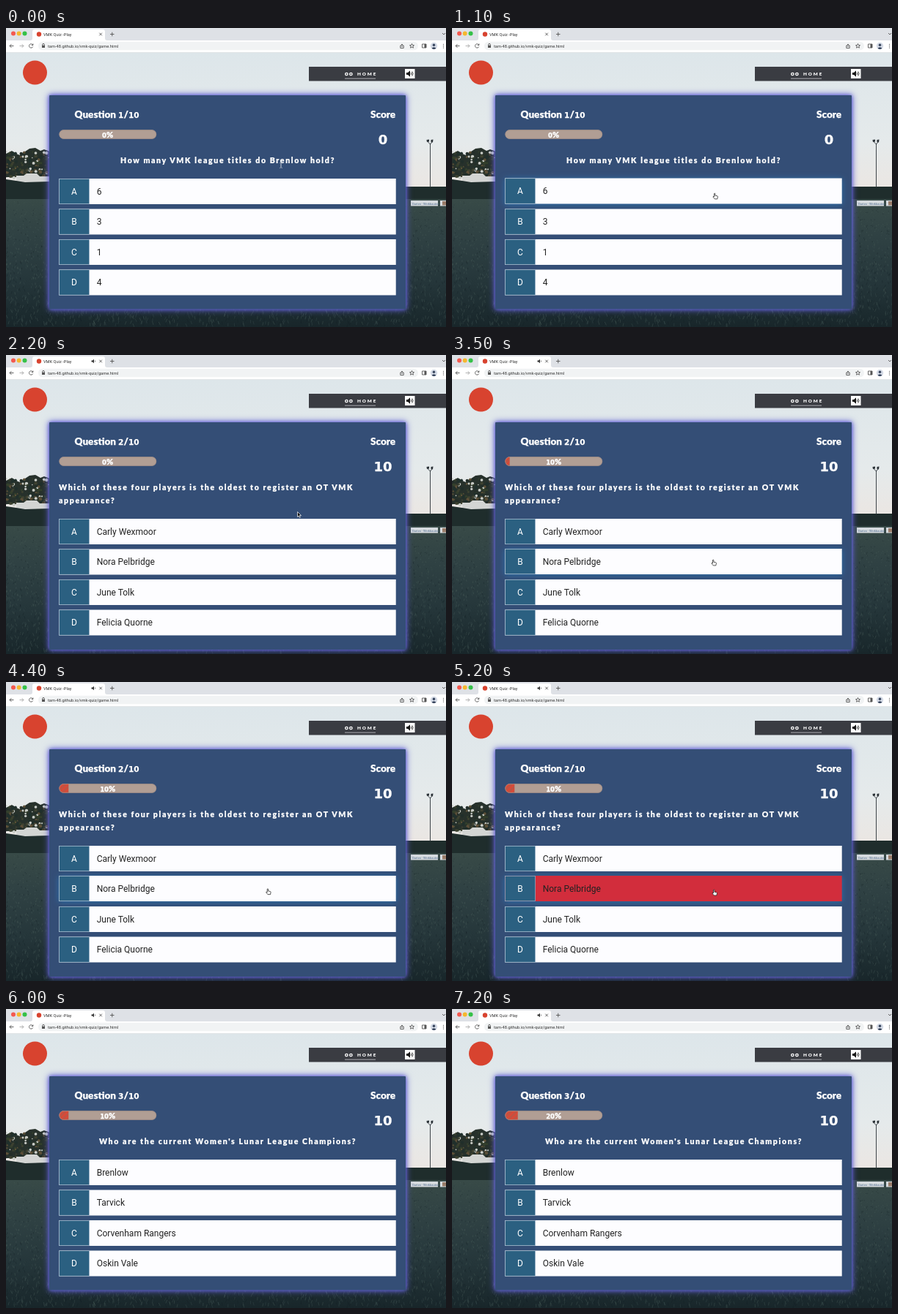
These frames come from a looping animation (600 px wide and 409 px high, 7300 ms). An HTML page:

```html
<!DOCTYPE html>
<html lang="en">
<head>
<meta charset="utf-8">
<title>VMK Quiz</title>
<style>
  html, body { margin: 0; height: 100%; overflow: hidden; }
  svg { display: block; width: 100vw; height: 100vh; }
  .ui { font: 5.7px Roboto, sans-serif; fill: #333; }
  .icon { fill: none; stroke: #555; stroke-width: .9; }
  .head { font: 900 13.5px Lato, sans-serif; fill: #fff; stroke: #fff; stroke-width: .25; }
  .ask { font: 900 10.5px Lato, sans-serif; fill: #fff; stroke: #fff; stroke-width: .2; letter-spacing: 1.65px; }
  .num { font-family: "DejaVu Sans", sans-serif; font-weight: 700; font-size: .78em; }
  .row { font: 12px Roboto, sans-serif; }
  .mid { text-anchor: middle; }
  #card { fill: #344e76; filter: drop-shadow(0 0 2px #6665d6) drop-shadow(0 0 4px #5f5ed2); }
  .hover { filter: drop-shadow(0 1.5px 4px #2b7ab8c0); }
</style>
</head>
<body>
<svg viewBox="0 0 600 409" preserveAspectRatio="none">
  <defs>
    <linearGradient id="sky" x2="0" y2="1">
      <stop stop-color="#dde6ea"/><stop offset=".65" stop-color="#e5eaeb"/><stop offset="1" stop-color="#ebe6e2"/>
    </linearGradient>
    <linearGradient id="grass" x2="0" y2="1">
      <stop stop-color="#384a47"/><stop offset=".3" stop-color="#2f4143"/>
      <stop offset=".65" stop-color="#25363a"/><stop offset="1" stop-color="#18262a"/>
    </linearGradient>
    <pattern id="stripes" width="5" height="5" patternUnits="userSpaceOnUse" patternTransform="rotate(45)">
      <path fill="#dc4836" d="M0 0h5v5H0z"/><path fill="#bd5444" d="M0 0h2.500v5H0z"/>
    </pattern>
    <clipPath id="pill"><rect x="72.5" y="139.3" width="132.5" height="12.4" rx="6.2"/></clipPath>
  </defs>

  <!-- pitch -->
  <path fill="url(#sky)" d="M0 33h600v190H0z"/>
  <path fill="#27312b" d="M0 172l8-4 6 4 5 2 7-5 6-4 8-1 7 4 5-2 8 3v35H0z"/>
  <g id="leaves"></g>
  <path fill="#d3d5d3" d="M14 202h10l4-3h14l4 4h13v8H14z"/>
  <path fill="#1f2d2c" d="M0 207l14 2 12 2 33-1h480v7h61v24H0z"/>
  <path fill="url(#grass)" d="M0 234h600v175H0z"/>
  <g id="blades" fill="none" stroke-width=".7"></g>
  <path fill="none" stroke="#2c3338" stroke-width=".9" d="M578.500 158v60M574.500 155l4 4 3-4"/>
  <path fill="#2c3338" d="M573.500 153l3.500-.5v3l-3 .5zM579.500 153l3-.5-.5 4-2.500-.5z"/>
  <path fill="#d5dade" d="M552 236h37v7.500h-37zM592 236h8v7.500h-8z"/>
  <path fill="#9a7d6a" d="M595 237h5v5.500h-5z"/>
  <text x="554" y="241.700" font-family="Roboto, sans-serif" font-size="4" fill="#4d6a8c">Garten - Werkbauten</text>

  <!-- browser -->
  <path fill="#dee1e6" d="M0 0h600v17H0z"/>
  <path fill="#fff" d="M33 17q3 0 3-3V5q0-3 3-3h93q3 0 3 3v9q0 3 3 3h462v16.500H0V17z"/>
  <path fill="#d5d8da" d="M0 33h600v.6H0z"/>
  <circle cx="10" cy="7.500" r="3" fill="#f4594f"/>
  <circle cx="17.600" cy="7.500" r="3" fill="#f5b82e"/>
  <circle cx="25.500" cy="7.500" r="3" fill="#35c148"/>
  <circle cx="45" cy="8.500" r="3.200" fill="#d8432f"/>
  <text class="ui" x="51" y="10.500">VMK Quiz -Play</text>
  <path id="sound" fill="#333" d="M116.500 7.500h1.500l2-1.800v5.600l-2-1.800h-1.500zM121 7q1.500 1.500 0 3z"/>
  <path class="icon" d="M127.300 6.700l3.600 3.600m0-3.600l-3.600 3.600M142 8.500h5.500m-2.750-2.750v5.500M595 7l2 2 2-2"/>
  <rect x="44" y="18.800" width="518" height="11.500" rx="5.700" fill="#f1f3f4"/>
  <path class="icon" d="M10.500 24.500h-5.500m2.500-2.500l-2.500 2.500 2.500 2.500M36.500 23a2.700 2.700 0 1 0 .2 2.500m.2-4v2h-2"/>
  <path class="icon" style="stroke:#aaa" d="M18.500 24.500h5.500m-2.500-2.500l2.500 2.500-2.500 2.500"/>
  <path class="icon" d="M49.700 24v-1.300a1.300 1.300 0 0 1 2.600 0V24"/>
  <path fill="#555" d="M49 23.800h4v3.200h-4z"/>
  <text class="ui" x="57" y="26.500">tam-48.github.io/vmk-quiz/game.html</text>
  <path class="icon" d="M539 24h-1.200v3.500h4.400V24H541m-1 2v-4m-1.300 1.300l1.300-1.300 1.300 1.300M553.500 21.500l.9 2 2.100.2-1.600 1.400.5 2.100-1.900-1.100-1.900 1.100.5-2.100-1.600-1.400 2.100-.2zM567.500 22h5.500v5h-5.500z"/>
  <path fill="#555" d="M570.500 22h2.500v5h-2.500z"/>
  <circle cx="583.500" cy="24.500" r="4.700" fill="#d5dbe6"/>
  <path fill="#33415a" d="M580.500 27.700q3-3 6 0-3 2.500-6 0z"/><circle cx="583.500" cy="23.200" r="1.700" fill="#33415a"/>
  <path stroke="#555" stroke-width="1.300" stroke-linecap="round" d="M596.500 22.300v0M596.500 24.700v0M596.500 27.100v0"/>

  <!-- page header -->
  <circle cx="39.500" cy="61" r="16.500" fill="#d8432f"/>
  <path fill="#3a3c42" d="M413 53h187v19.500H413z"/>
  <path fill="none" stroke="#fff" stroke-width="1.300" d="M462.700 63a1.700 1.700 0 1 0 3.400 0 1.700 1.700 0 1 0-3.400 0M468.700 63a1.700 1.700 0 1 0 3.400 0 1.700 1.700 0 1 0-3.400 0"/>
  <text x="479" y="65.200" fill="#fff" font-family="Lato, sans-serif" font-weight="900" font-size="6.300" letter-spacing="1.900">HOME</text>
  <path fill="#c9cbd0" d="M462 68.700h42v.7h-42z"/>
  <path fill="#fff" d="M544 56h13.500v13H544z"/>
  <path fill="#111" d="M546 61h2l3-2.700v8.400L548 64h-2z"/>
  <path fill="none" stroke="#111" stroke-width=".9" d="M552.300 61q1.200 1.500 0 3M553.700 59.500q2.600 3 0 6"/>

  <!-- quiz card -->
  <rect id="card" x="59" y="92" width="486" height="292.500" rx="1"/>
  <text id="counter" class="head" x="93.500" y="122.500"></text>
  <text class="head" x="497" y="122.500">Score</text>
  <text id="score" class="head mid" x="514" y="159" style="font-size:23px"></text>
  <g clip-path="url(#pill)">
    <path fill="#b19e94" d="M72 139h133v13H72z"/>
    <rect id="fill" x="72" y="139" height="13" fill="url(#stripes)"/>
  </g>
  <rect x="72.800" y="139.600" width="132" height="11.800" rx="5.900" fill="none" stroke="#a08c84" stroke-width=".7"/>
  <text id="percent" class="head mid" x="138.700" y="149.700" style="font-size:11px"></text>
  <g id="ask" class="ask"></g>
  <g id="rows"></g>
  <g id="cursor" stroke-width=".7" stroke-linejoin="round">
    <path id="beam" fill="none" stroke="#b8c0cc" d="M-2-3.500q2 0 2 1.200v4.600q0 1.200-2 1.200M2-3.500q-2 0-2 1.200v4.600q0 1.200 2 1.200"/>
    <path id="arrow" fill="#111" stroke="#fff" d="M-1.500-3.500v7l1.600-1.500 1.200 2.500 1.100-.5-1.100-2.500h2.200z"/>
    <path id="hand" fill="#fff" stroke="#111" d="M-1.500-3.500q.8-.8 1.400 0v2.700l2.700.5q.9.300.8 1.300l-.6 2.900h-3.500l-2.300-2.800q0-1 1-.6l.5.500z"/>
  </g>
</svg>
<script>
const LOOP = 7300, PITCH = 41.5, ROW_HEIGHT = 35;
const REVEAL = 1000, BAR_DELAY = 1040, BAR_TIME = 600, BAR_STEP = 13.3;
const $ = id => document.getElementById(id);

const scenes = [
  { top: 206, bottom: 384.5, lines: ['How many VMK league titles do Brenlow hold?'],
    answers: ['6', '3', '1', '4'], pick: 0, click: 1160, color: '#2fa84c', points: 10 },
  { top: 224, bottom: 403,
    lines: ['Which of these four players is the oldest to register an OT VMK', 'appearance?'],
    answers: ['Carly Wexmoor', 'Nora Pelbridge', 'June Tolk', 'Felicia Quorne'],
    pick: 1, click: 4960, color: '#d22d3c', points: 0 },
  { top: 206, bottom: 384.5, lines: ["Who are the current Women's Lunar League Champions?"],
    answers: ['Brenlow', 'Tarvick', 'Corvenham Rangers', 'Oskin Vale'], click: Infinity, points: 0 }
];
// Each question follows the reveal of the previous answer.
scenes.forEach((scene, i) => scene.start = i ? scenes[i - 1].click + REVEAL : 0);
const barSteps = scenes.slice(1).map(scene => scene.start + BAR_DELAY);
const mousePath = [[0, 375, 188], [1000, 359, 230], [1500, 359, 230], [2160, 399, 218],
  [2400, 399, 218], [3400, 357, 284], [5000, 358, 288], [scenes[2].start, 358, 288]];

const digits = s => s.replace(/\d+/g, '<tspan class="num">$&</tspan>');
const clamp = p => Math.min(1, Math.max(0, p));
const smooth = p => p * p * (3 - 2 * p);

let seed = 7;
const random = () => (seed = seed * 16807 % 2147483647) / 2147483647;

function scatterLeaves() {
  const tones = ['#3d4130', '#34402c', '#5d5038', '#232e29', '#20302c', '#c9ccc6'];
  let out = '';
  for (let i = 0; i < 170; i++) {
    const r = .8 + random() * 1.5;
    out += `<circle cx="${random() * 58}" cy="${169 + random() * 37}" r="${r}" fill="${tones[i % 6]}"/>`;
  }
  $('leaves').innerHTML = out;
}

function growGrass() {
  $('blades').innerHTML = ['#52655f', '#121f23', '#3f5354'].map(color => {
    let d = '';
    for (let i = 0; i < 1400; i++) {
      const y = 238 + random() * 171, size = (y - 205) / 45;
      d += `M${random() * 600} ${y}l${(random() - .5) * size} ${-size}`;
    }
    return `<path stroke="${color}" opacity=".5" d="${d}"/>`;
  }).join('');
}

const rows = [...'ABCD'].map(letter => {
  const g = document.createElementNS('http://www.w3.org/2000/svg', 'g');
  g.innerHTML = `<rect x="72.300" width="459.400" height="${ROW_HEIGHT}"/>
    <rect x="72.600" y=".3" width="41" height="34.400" fill="#2b6081" stroke="#a9bfd2" stroke-width=".6"/>
    <text class="mid" x="93" y="21.700" fill="#fff">${letter}</text><text x="123.700" y="21.700" fill="#222"></text>`;
  $('rows').append(g);
  return g;
});

function mouseAt(t) {
  const i = mousePath.findIndex(p => p[0] > t);
  if (i < 0) return null;
  const [t0, x0, y0] = mousePath[i - 1], [t1, x1, y1] = mousePath[i];
  const p = smooth((t - t0) / (t1 - t0));
  return [x0 + (x1 - x0) * p, y0 + (y1 - y0) * p];
}

let shown;
function showScene(scene) {
  shown = scene;
  $('card').setAttribute('height', scene.bottom - 92);
  $('counter').innerHTML = digits(`Question ${scenes.indexOf(scene) + 1}/10`);
  const wrapped = scene.lines.length > 1;
  $('ask').innerHTML = scene.lines.map((line, i) =>
    `<text x="${wrapped ? 72 : 302.5}" y="${184.500 + i * 18}" class="${wrapped ? '' : 'mid'}">${line}</text>`).join('');
  rows.forEach((row, i) => row.lastChild.textContent = scene.answers[i]);
}

function render(t) {
  const scene = scenes.findLast(s => t >= s.start);
  if (scene !== shown) showScene(scene);

  const mouse = mouseAt(t);
  let over = -1;
  rows.forEach((row, i) => {
    const y = scene.top + i * PITCH;
    const hover = mouse && mouse[1] >= y && mouse[1] <= y + ROW_HEIGHT;
    if (hover) over = i;
    row.setAttribute('transform', `translate(0 ${y - (hover ? .5 : 0)})`);
    row.setAttribute('class', hover ? 'row hover' : 'row');
    row.firstChild.setAttribute('fill', i === scene.pick && t >= scene.click ? scene.color : '#fdfdff');
  });

  const score = scenes.reduce((sum, s) => sum + (t >= s.click ? s.points : 0), 0);
  $('score').innerHTML = digits(`${score}`);
  $('percent').innerHTML = digits(`${barSteps.filter(s => t >= s).length * 10}%`);
  $('fill').setAttribute('width', barSteps.reduce((sum, s) => sum + BAR_STEP * clamp((t - s) / BAR_TIME), 0));
  $('sound').style.display = t >= scenes[0].click + 100 ? '' : 'none';

  $('cursor').style.display = mouse ? '' : 'none';
  if (!mouse) return;
  $('cursor').setAttribute('transform', `translate(${mouse})`);
  const kind = over >= 0 ? 'hand' : mouse[1] < 195 ? 'beam' : 'arrow';
  for (const id of ['beam', 'arrow', 'hand']) $(id).style.display = id === kind ? '' : 'none';
}

scatterLeaves();
growGrass();
const begin = performance.now();
(function tick() {
  render((performance.now() - begin) % LOOP);
  requestAnimationFrame(tick);
})();
</script>
</body>
</html>
```
